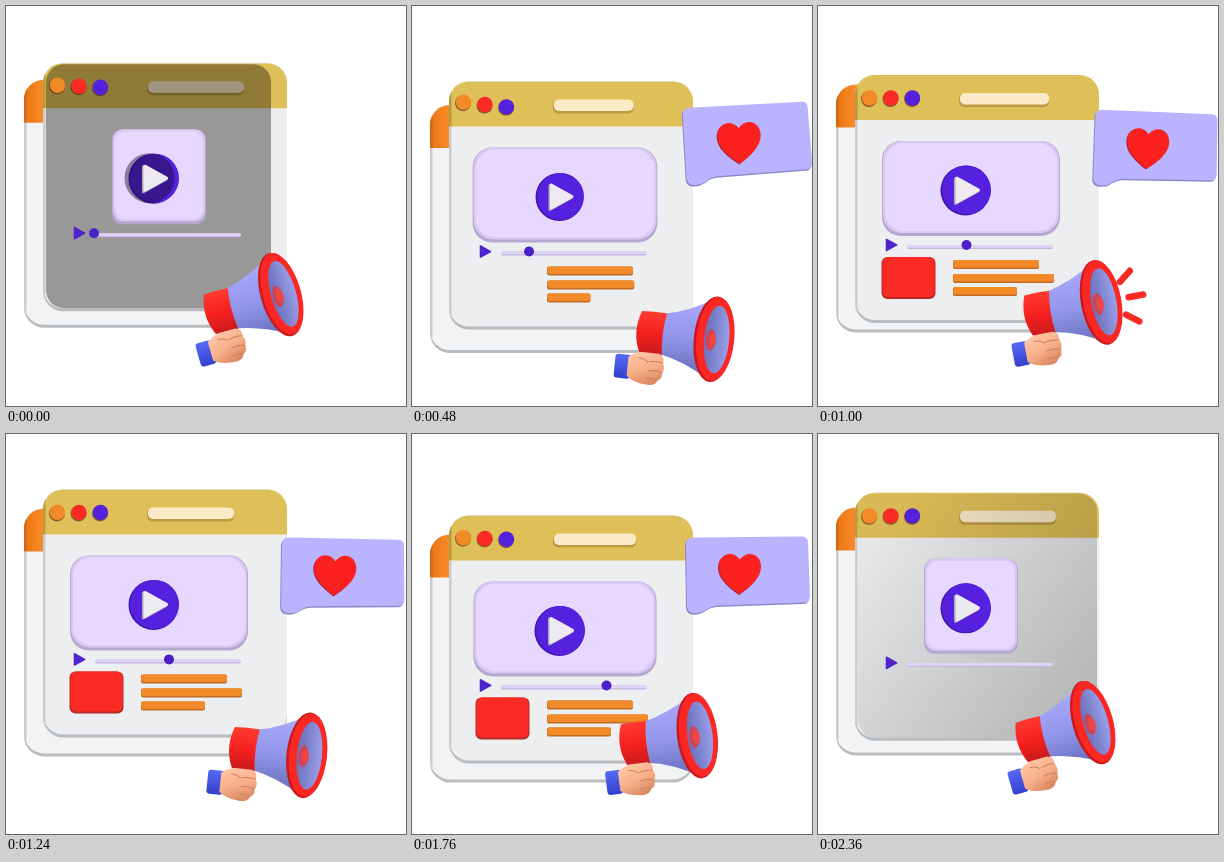
Animation of 400x400 px, one loop 2400 ms. Source, as an HTML page with a canvas:

```html
<!DOCTYPE html>
<html lang="en">
<head>
<meta charset="utf-8">
<title>Video announcement</title>
<style>
html, body { margin: 0; width: 100%; height: 100%; overflow: hidden; background: #fff; }
canvas { display: block; width: 400px; height: 400px; }
</style>
</head>
<body>
<canvas id="stage" width="400" height="400"></canvas>
<script>
const ctx = document.getElementById('stage').getContext('2d');
const LOOP = 2400, STEP = 40;
const RED = '#fb2a25', ORANGE = '#f28a27', VIOLET = '#5520de', LILAC = '#e6d8ff';

// Smooth track through "time value" pairs, without overshoot between keys.
function track(...flat) {
  const keys = [];
  for (let i = 0; i < flat.length; i += 2) keys.push([flat[i], flat[i + 1]]);
  const slope = i => (keys[i + 1][1] - keys[i][1]) / (keys[i + 1][0] - keys[i][0]);
  const tangent = i => {
    if (i === 0 || i === keys.length - 1) return 0;
    const a = slope(i - 1), b = slope(i);
    return a * b > 0 ? 2 * a * b / (a + b) : 0;
  };
  return t => {
    if (t <= keys[0][0]) return keys[0][1];
    const i = keys.findIndex(k => k[0] > t) - 1;
    if (i < 0) return keys[keys.length - 1][1];
    const [t0, v0] = keys[i], [t1, v1] = keys[i + 1], d = t1 - t0, u = (t - t0) / d;
    return v0 + (v1 - v0) * u * u * (3 - 2 * u)
      + d * u * (1 - u) * (tangent(i) * (1 - u) - tangent(i + 1) * u);
  };
}

const frontTop = track(-500, 84.5, 100, 55, 700, 84.5, 1280, 55, 1880, 84.5, 2500, 55);
const backTop = t => 87 + 13.5 * Math.cos((t - 570) / 1200 * 2 * Math.PI);
const dotTilt = track(0, 1, 280, 2.5, 680, 2, 1000, 0, 1520, 0, 2000, 1.5, 2360, 0);
const pillWidth = track(0, 97, 280, 87, 680, 77, 1000, 90, 1520, 83, 2000, 83, 2360, 97);
const panelHalf = track(0, 47, 260, 94.5, 680, 90, 1000, 89, 1520, 89, 1960, 93.5, 2000, 93, 2300, 47);
const playRadius = track(0, 25, 280, 20.5, 620, 26, 1000, 25);
const knobRadius = track(2160, 5, 2320, 0);
const squareScale = track(720, 0, 900, 1.08, 1000, 1, 1800, 1, 2000, 1.04, 2200, 0);
const textLines = [
  { y: 189, w: 86, end: track(100, 0, 280, .9, 380, 1), start: track(1900, 0, 2000, .21, 2180, 1) },
  { y: 203, w: 101, end: track(220, 0, 280, .25, 560, .96, 1000, 1), start: track(1840, 0, 2000, .64, 2100, 1) },
  { y: 216, w: 64, end: track(320, 0, 600, 1.12, 680, 1.1, 1000, 1), start: track(1760, 0, 2000, .93, 2040, 1) }
];
const bubbleScale = track(40, 0, 240, 1.17, 280, 1.15, 640, .97, 1000, 1, 2000, 1, 2040, 1.04, 2220, 0);
const bubbleAngle = track(40, -25, 280, -11, 680, 2.3, 900, 3, 1000, 3, 1520, 0);
const hornX = track(0, 214, 280, 234, 420, 240, 680, 229, 860, 219, 1000, 221, 1220, 238, 1600, 213, 2000, 240, 2360, 214);
const hornY = track(0, 306, 280, 325, 420, 327, 680, 325, 860, 308, 1000, 308, 1220, 315, 1600, 305, 2000, 318, 2360, 306);
const hornAngle = track(0, -16, 280, 1, 420, 7, 680, -6, 860, -15, 1000, -10.6, 1220, 6, 1600, -15.5, 2000, 8, 2360, -16);
const hornShadow = track(1400, 0, 1520, 1, 1640, 0);
const bursts = [880, 1300, 2060], BURST = 260;

function rect(x, y, w, h, r, fill) {
  if (w <= 0 || h <= 0) return;
  ctx.beginPath();
  ctx.roundRect(x, y, w, h, r);
  ctx.fillStyle = fill;
  ctx.fill();
}
function oval(x, y, rx, ry, fill) {
  ctx.beginPath();
  ctx.ellipse(x, y, Math.max(0, rx), Math.max(0, ry), 0, 0, 7);
  ctx.fillStyle = fill;
  ctx.fill();
}
function shape(d, fill) {
  ctx.fillStyle = fill;
  ctx.fill(new Path2D(d));
}
function at(x, y, angle, scale, draw) {
  ctx.save();
  ctx.translate(x, y);
  ctx.rotate(angle * Math.PI / 180);
  ctx.scale(scale, scale);
  draw();
  ctx.restore();
}
function gradient(x0, y0, x1, y1, ...colors) {
  const g = ctx.createLinearGradient(x0, y0, x1, y1);
  colors.forEach((c, i) => g.addColorStop(i / (colors.length - 1), c));
  return g;
}
function triangle(x, y, s, fill) {
  ctx.beginPath();
  ctx.moveTo(x - s * .8, y - s);
  ctx.lineTo(x + s, y);
  ctx.lineTo(x - s * .8, y + s);
  ctx.closePath();
  ctx.fillStyle = ctx.strokeStyle = fill;
  ctx.lineJoin = 'round';
  ctx.lineWidth = s / 4;
  ctx.fill();
  ctx.stroke();
}

// Window body: bevelled slab with a coloured title bar.
function windowSlab(x, y, w, barHeight, body, bar, barSide) {
  rect(x, y, w, 248, 20, '#b9bcbf');
  ctx.save();
  ctx.beginPath();
  ctx.roundRect(x, y, w, 245, 20);
  ctx.clip();
  rect(x, y, w, 248, 0, body);
  rect(x, y, w, barHeight, 0, bar);
  rect(x, y, 2.5, barHeight, 0, barSide);
  rect(x, y + barHeight, 2.5, 248, 0, '#c9cccf');
  ctx.restore();
}

function drawShade(t, y) {
  const fading = t < 120, closing = t > 2260;
  if (!fading && !closing) return;
  ctx.globalAlpha = fading ? 1 - t / 120 : (t - 2260) / 100;
  rect(40, y + 1, fading ? 225 : 239, 244, 18, fading ? 'rgba(0,0,0,.36)'
    : gradient(60, y + 40, 260, y + 180, 'rgba(0,0,0,.03)', 'rgba(0,0,0,.22)'));
  ctx.globalAlpha = 1;
}

function drawFront(t) {
  const y = frontTop(t);
  windowSlab(37, y, 244, 45, '#edeeef', '#dfbf57', '#b79a3e');
  rect(141, y + 19, pillWidth(t), 13, 5, '#bd9b42');
  rect(142, y + 18, pillWidth(t) - 1, 11.5, 5, '#fbe9c8');
  drawShade(t, y);

  [ORANGE, RED, VIOLET].forEach((color, i) => {
    const cy = y + 23 + (i - 1) * dotTilt(t);
    oval(51 + i * 21.5, cy + 1, 8, 8, 'rgba(70,30,20,.6)');
    oval(51.5 + i * 21.5, cy, 7.7, 7.7, color);
  });

  const half = panelHalf(t), r = half / 5 + 1;
  rect(153 - half, y + 66, half * 2, 95, r, '#b7a8cf');
  rect(154 - half, y + 66, half * 2 - 2, 92, r, '#d8c8f3');
  rect(156 - half, y + 68, half * 2 - 6, 88, r, LILAC);

  const radius = playRadius(t), cy = y + 115;
  oval(147.5, cy + .5, radius, radius, '#3f15a8');
  oval(148.5, cy, radius - .5, radius - .5, VIOLET);
  if (t < 120) oval(143.5, cy, radius, radius, `rgba(20,10,40,${.45 * (1 - t / 120)})`);
  triangle(147.5, cy + 1, radius * .5, '#aaa3b5');
  triangle(148.5, cy, radius * .48, '#eeeaf2');

  triangle(73, y + 170, 5.7, '#5025cf');
  rect(89, y + 170, 146, 4, 2, '#c4b6df');
  rect(89, y + 170, 146, 2.8, 1.5, '#e0d3f8');
  oval(88 + t * .0605, y + 170, knobRadius(t), knobRadius(t), '#4c20c8');

  for (const { y: dy, w, start, end } of textLines) {
    const left = 135 + w * start(t), width = w * (end(t) - start(t));
    rect(left, y + dy - 4, width, 9, 2, '#bf6d25');
    rect(left + .5, y + dy - 4, width - .5, 7.5, 2, ORANGE);
  }

  const s = squareScale(t);
  if (s > 0) at(90.5, y + 202.5, 0, s, () => {
    rect(-27, -20.5, 54, 42, 6, '#b52a2a');
    rect(-26, -20.5, 52, 40, 6, RED);
  });
}

function drawBubble(t) {
  const s = bubbleScale(t);
  if (s <= 0) return;
  const outline = 'M0-73L109-74Q115-74 115-68L117-14Q117-8 111-8L24-5Q17-4 12 0Q6 4-2 2Q-6 0-6-5L-7-66Q-7-73 0-73Z';
  at(280, 178, bubbleAngle(t), s, () => {
    shape(outline, '#8e89c9');
    ctx.save();
    ctx.translate(1, -1.5);
    shape(outline, '#bab3ff');
    ctx.restore();
    const heart = 'M48-18C38-25 27-34 27-45C27-59 42-62 48-52C54-62 69-59 69-45C69-34 58-25 48-18Z';
    ctx.save();
    ctx.translate(-1, 1);
    shape(heart, '#b42335');
    ctx.restore();
    shape(heart, '#fa211f');
  });
}

function drawRays(t) {
  const begin = bursts.find(b => t >= b && t < b + BURST);
  if (begin === undefined) return;
  const p = (t - begin) / BURST;
  const outer = 20 + 22 * Math.min(1, p / .45);
  const inner = 20 + 22 * Math.max(0, Math.min(1, (p - .25) / .65));
  ctx.strokeStyle = RED;
  ctx.lineCap = 'round';
  ctx.lineWidth = 6.5 * Math.min(1, (1 - p) * 3 + .15);
  for (const a of [-.66, 0, .66]) {
    ctx.beginPath();
    ctx.moveTo(64 + inner * Math.cos(a), inner * Math.sin(a));
    ctx.lineTo(64 + outer * Math.cos(a), outer * Math.sin(a));
    ctx.stroke();
  }
}

function drawHorn(t) {
  ctx.globalAlpha = hornShadow(t);
  oval(238, 328, 21, 11, '#a9abac');
  ctx.globalAlpha = 1;
  at(hornX(t), hornY(t), hornAngle(t), 1, () => {
    drawRays(t);
    rect(-5, 14, 17, 13, 3, '#d51e20');
    // cone
    shape('M10-20Q36-25 62-41V41Q36 25 10 20Z', gradient(0, -35, 0, 38, '#a9a8fb', '#9296ea', '#686fbd'));
    // neck
    shape('M-11-21Q2-22 14-21Q10 0 13 22Q0 22-10 20Q-19 0-11-21Z', gradient(0, -21, 0, 22, '#ff3a30', '#f6211f', '#c8191d'));
    // bell
    oval(63, 0, 20, 43, '#c9191d');
    oval(64.5, -.5, 19, 42, '#fb2723');
    oval(66, 0, 12.5, 34, gradient(54, 0, 79, 0, '#6c70ba', '#9ba0ec'));
    oval(60, 1, 5, 11, '#c94659');
    oval(62, 1, 3.5, 7, '#ef4543');
    // hand
    rect(-33, 24, 16, 24, 3, gradient(0, 24, 0, 48, '#566af5', '#3440cd'));
    shape('M-20 26Q-12 19-2 20L10 20Q17 22 15 29Q18 34 15 39Q16 45 11 47Q9 53 0 52Q-13 51-20 45Z',
      gradient(-8, 20, 4, 52, '#ffc5a3', '#f7af8a', '#d9865f'));
    ctx.strokeStyle = '#cf805c';
    ctx.lineWidth = 1;
    ctx.stroke(new Path2D('M1 29Q8 27 15 29M1 38Q8 36 15 39M0 46Q6 44 11 47M-10 26Q-3 26 0 30'));
  });
}

function draw(t) {
  ctx.fillStyle = '#fff';
  ctx.fillRect(0, 0, 400, 400);
  const y = backTop(t);
  windowSlab(18, y, 263, 43, '#f2f3f4', gradient(18, 0, 38, 0, '#e8740f', '#fb8c2b'), '#cc6a18');
  drawFront(t);
  drawBubble(t);
  drawHorn(t);
}

function tick() {
  draw(Math.floor(performance.now() % LOOP / STEP) * STEP);
  requestAnimationFrame(tick);
}
tick();
</script>
</body>
</html>
```
